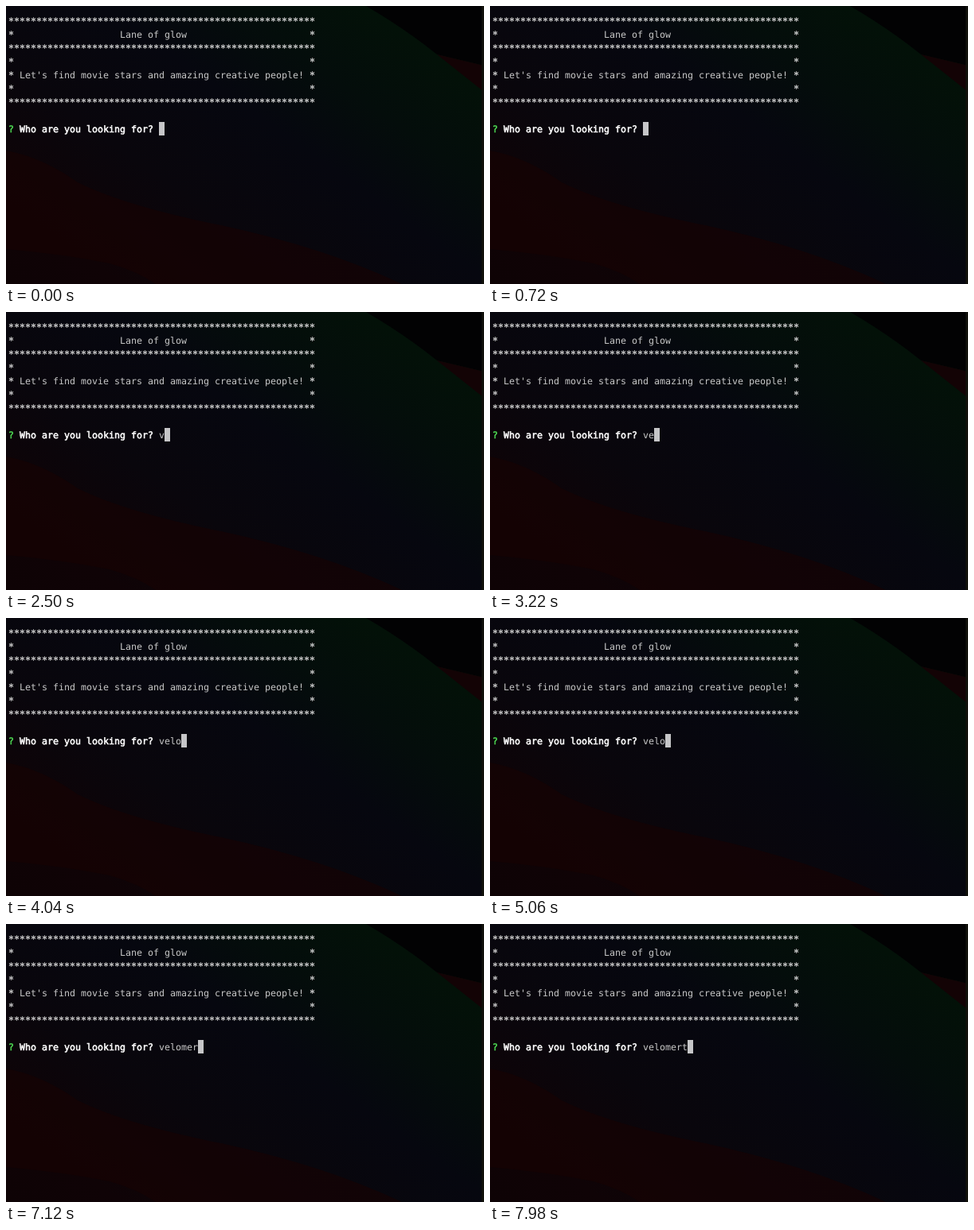
Write an HTML page that moves like this. It is 600 px wide and 350 px high and loops after 8000 ms.

```html
<!DOCTYPE html>
<html lang="en">
<head>
<meta charset="utf-8">
<title>Terminal prompt</title>
<style>
  html, body { margin: 0; width: 100%; height: 100%; overflow: hidden; background: #07070d; }
  svg { display: block; width: 100vw; height: 100vh; }
  text {
    font: 11.63px "DejaVu Sans Mono", "Liberation Mono", monospace;
    fill: #c8c8c8;
    white-space: pre;
    text-rendering: geometricPrecision;
  }
  .star { stroke: #c8c8c8; stroke-width: 0.35px; }
  .bold { fill: #fff; stroke: #fff; stroke-width: 0.55px; }
  .mark { fill: #52e858; stroke: #52e858; stroke-width: 0.4px; }
</style>
</head>
<body>
<svg viewBox="0 0 600 350">
  <defs>
    <linearGradient id="glow" gradientUnits="userSpaceOnUse" x1="525" y1="54" x2="209" y2="495">
      <stop offset="0" stop-color="#031108"/>
      <stop offset="0.18" stop-color="#040d0b"/>
      <stop offset="0.35" stop-color="#06070f"/>
      <stop offset="0.6" stop-color="#09060c"/>
      <stop offset="0.85" stop-color="#0f0306"/>
      <stop offset="1" stop-color="#0e0305"/>
    </linearGradient>
  </defs>
  <rect width="600" height="350" fill="url(#glow)"/>
  <path d="M452 0H600V75L541 61Q500 28 452 0Z" fill="#020203"/>
  <path d="M541 61L600 75V108Z" fill="#130305"/>
  <path d="M0 182Q45 190 90 222Q150 252 270 276Q400 304 497 350H188Q165 334 130 324Q70 312 0 306Z"
    fill="#180203" opacity="0.6"/>
  <rect x="597" width="3" height="350" fill="#10100a"/>
  <g id="screen"></g>
  <rect id="cursor" y="146" width="7" height="17" fill="#c6c6c8"/>
</svg>
<script>
const LOOP = 8000, CELL = 7, LEFT = 3, INPUT_COL = 27;
const WORD = "velomert";
const KEY_TIMES = [2480, 2960, 3340, 3740, 5440, 5840, 6720, 7220];

const screen = document.getElementById("screen");
const cursor = document.getElementById("cursor");
const colX = col => LEFT + CELL * col;

function put(row, col, str, cls = "", dy = 0) {
  const el = document.createElementNS("http://www.w3.org/2000/svg", "text");
  el.setAttribute("x", colX(col));
  el.setAttribute("y", 6 + 17 * row + dy);
  el.setAttribute("class", cls);
  el.textContent = str;
  screen.append(el);
  return el;
}

const stars = (row, col, count) => put(row, col, "*".repeat(count), "star", -0.5);

for (const row of [1, 3, 7]) stars(row, 0, 55);
for (const row of [2, 4, 5, 6]) {
  stars(row, 0, 1);
  stars(row, 54, 1);
}
put(2, 20, "Lane of glow");
put(5, 2, "Let's find movie stars and amazing creative people!");
put(9, 0, "?", "mark");
put(9, 2, "Who are you looking for?", "bold");
const input = put(9, INPUT_COL, "");

function render(t) {
  const count = KEY_TIMES.filter(k => k <= t).length;
  input.textContent = WORD.slice(0, count);
  cursor.setAttribute("x", colX(INPUT_COL + count));
}

function tick() {
  render(performance.now() % LOOP);
  requestAnimationFrame(tick);
}
tick();
</script>
</body>
</html>
```
